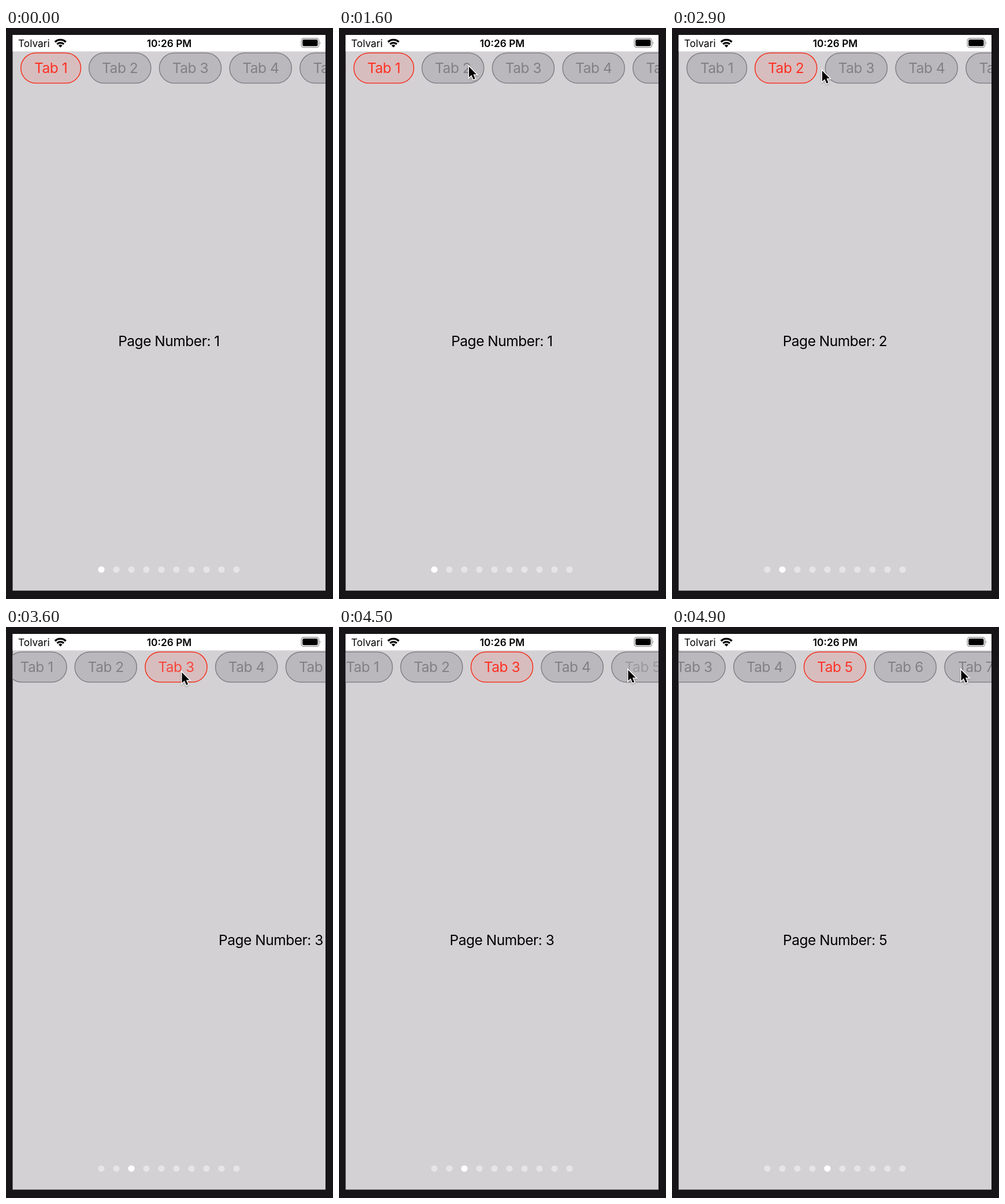
An HTML page for the animation above (5000 ms loop, 566 px wide and 989 px high).

```html
<!DOCTYPE html>
<html lang="en">
<head>
<meta charset="utf-8">
<title>Tab pager</title>
<style>
  html, body { margin: 0; width: 100%; height: 100%; overflow: hidden; background: #171518; }
  svg { display: block; width: 566px; height: 989px; }
  text { font-family: Inter, Roboto, sans-serif; font-size: 24.5px; letter-spacing: -.48px; }
  .mid { text-anchor: middle; }
  .status { font-size: 17.3px; letter-spacing: 0; }
  .clock { font-weight: 600; }
  .tab rect { fill: #bab8bd; stroke: #828085; stroke-width: 1.5; }
  .tab text { fill: #828085; }
  .tab.on rect { fill: #d8bdbe; stroke: #f5311f; }
  .tab.on text { fill: #ff3024; }
  .dot { fill: #fff; }
  #cursor path { stroke: #fff; stroke-width: 3; paint-order: stroke; }
  #cursor { filter: drop-shadow(0 1px 1px rgba(0, 0, 0, .35)); }
</style>
</head>
<body>
<svg viewBox="0 0 566 989">
  <defs>
    <clipPath id="screen"><rect x="11.5" y="12" width="541.5" height="962.5"/></clipPath>
  </defs>
  <g clip-path="url(#screen)">
    <rect x="11" y="12" width="543" height="963" fill="#d3d1d4"/>
    <g id="pages"></g>
    <g id="dots"></g>
    <g id="tabs"></g>
    <rect x="11" y="12" width="543" height="28.5" fill="#fff"/>
    <text class="status" x="21" y="32.5">Tolvari</text>
    <g fill="none" stroke="#000" stroke-width="3.3">
      <path d="M84.8 24.3a13.4 13.4 0 0 1 18.8 0"/>
      <path d="M88.4 28a8.3 8.3 0 0 1 11.6 0"/>
      <path d="M94.2 33.8l-3.3-3.4a4.8 4.8 0 0 1 6.6 0z" fill="#000" stroke="none"/>
    </g>
    <text class="status clock mid" x="282.5" y="32.5">10:26 PM</text>
    <rect x="511.2" y="18" width="30.4" height="15.6" rx="4" fill="none" stroke="#8e8e8e" stroke-width="1.3"/>
    <rect x="513.2" y="20" width="26.4" height="11.6" rx="2.4"/>
    <path d="M543.3 23.2q2.2 2.6 0 5.2z" fill="#8e8e8e"/>
    <g id="cursor"><path d="M0 0V18.5L4.3 14.5 7.6 22 10.6 20.8 7.5 13.2H13z"/></g>
  </g>
</svg>
<script>
const LOOP = 5000, STEP = 100, COUNT = 10, PAGE_WIDTH = 542, CENTER = 282;
const SCROLL_TIME = 300, FADE_TIME = 470, DIM = .25;

// Each tap: touch time, release time, tab index
const taps = [
  { down: 2000, up: 2184, tab: 1 },
  { down: 3300, up: 3416, tab: 2 },
  { down: 4500, up: 4602, tab: 4 }
];

// Pointer path: time, x, y
const path = [
  [1000, 58.5, 121], [1100, 30.5, 82], [1200, 62, 46], [1300, 120, 33],
  [1400, 185, 45], [1500, 225, 60], [1600, 225, 67], [1700, 225.5, 74],
  [2800, 225.5, 74], [2900, 260, 74], [3000, 290, 76], [3100, 304.5, 78.5],
  [4000, 304.5, 78.5], [4100, 326, 76], [4200, 378, 70], [4300, 438, 66],
  [4400, 488, 70], [4500, 500.5, 74.5]
];

const $ = id => document.getElementById(id);
const clamp = v => Math.min(1, Math.max(0, v));
const mix = (a, b, k) => a + (b - a) * k;
const ease = u => (1 - Math.cos(Math.PI * clamp(u))) / 2;
const easeOut = u => 1 - (1 - clamp(u)) ** 3;

function add(parent, name, attrs, label = '') {
  const el = document.createElementNS('http://www.w3.org/2000/svg', name);
  for (const key in attrs) el.setAttribute(key, attrs[key]);
  el.textContent = label;
  return parent.appendChild(el);
}

const tabX = i => i ? 143.6 + 121.75 * (i - 1) : 25.7;
const tabWidth = i => i ? 107.2 : 103.8;
const tabScroll = i => Math.max(0, tabX(i) + tabWidth(i) / 2 - CENTER);

const tabs = [], labels = [], dots = [];
for (let i = 0; i < COUNT; i++) {
  const x = tabX(i), width = tabWidth(i);
  const tab = add($('tabs'), 'g', { class: 'tab' });
  add(tab, 'rect', { x, y: 43.2, width, height: 52.4, rx: 26.2 });
  labels.push(add(tab, 'text', { class: 'mid', x: x + width / 2, y: 78 }, `Tab ${i + 1}`));
  tabs.push(tab);
  add($('pages'), 'text', { class: 'mid', x: CENTER + PAGE_WIDTH * i, y: 551 }, `Page Number: ${i + 1}`);
  dots.push(add($('dots'), 'circle', { class: 'dot', cx: 165 + 26 * i, cy: 938, r: 5.6 }));
}

function pointer(t) {
  const next = path.findIndex(p => p[0] > t);
  if (next < 0) return path[path.length - 1].slice(1);
  const [a, b] = [path[next - 1], path[next]];
  const k = (t - a[0]) / (b[0] - a[0]);
  return [mix(a[1], b[1], k), mix(a[2], b[2], k)];
}

function draw(t) {
  let current = 0, page = 0, scroll = 0;
  const alpha = Array(COUNT).fill(1), glow = Array(COUNT).fill(0);
  glow[0] = 1;

  for (const { down, up, tab } of taps) {
    if (t < down) break;
    if (t < up) {
      alpha[tab] = mix(1, DIM, clamp((t - down + 60) / 100));
      break;
    }
    const dt = t - up;
    page = mix(page, tab, ease(dt / SCROLL_TIME));
    scroll = mix(scroll, tabScroll(tab), ease((dt - 6) / (SCROLL_TIME - 6)));
    alpha[tab] = mix(DIM, 1, easeOut(dt / FADE_TIME));
    glow[current] = 1 - clamp((dt - 20) / 140);
    glow[tab] = clamp(dt / 30);
    current = tab;
  }

  tabs.forEach((el, i) => el.classList.toggle('on', i === current));
  labels.forEach((el, i) => el.setAttribute('opacity', alpha[i]));
  dots.forEach((el, i) => el.setAttribute('opacity', mix(.42, 1, glow[i])));
  $('tabs').setAttribute('transform', `translate(${-scroll})`);
  $('pages').setAttribute('transform', `translate(${-page * PAGE_WIDTH})`);

  const shown = t >= path[0][0];
  $('cursor').setAttribute('visibility', shown ? 'visible' : 'hidden');
  if (shown) $('cursor').setAttribute('transform', `translate(${pointer(t)})`);
}

const start = performance.now();
function frame() {
  const t = (performance.now() - start) % LOOP;
  draw(Math.floor(t / STEP) * STEP);
  requestAnimationFrame(frame);
}
frame();
</script>
</body>
</html>
```
